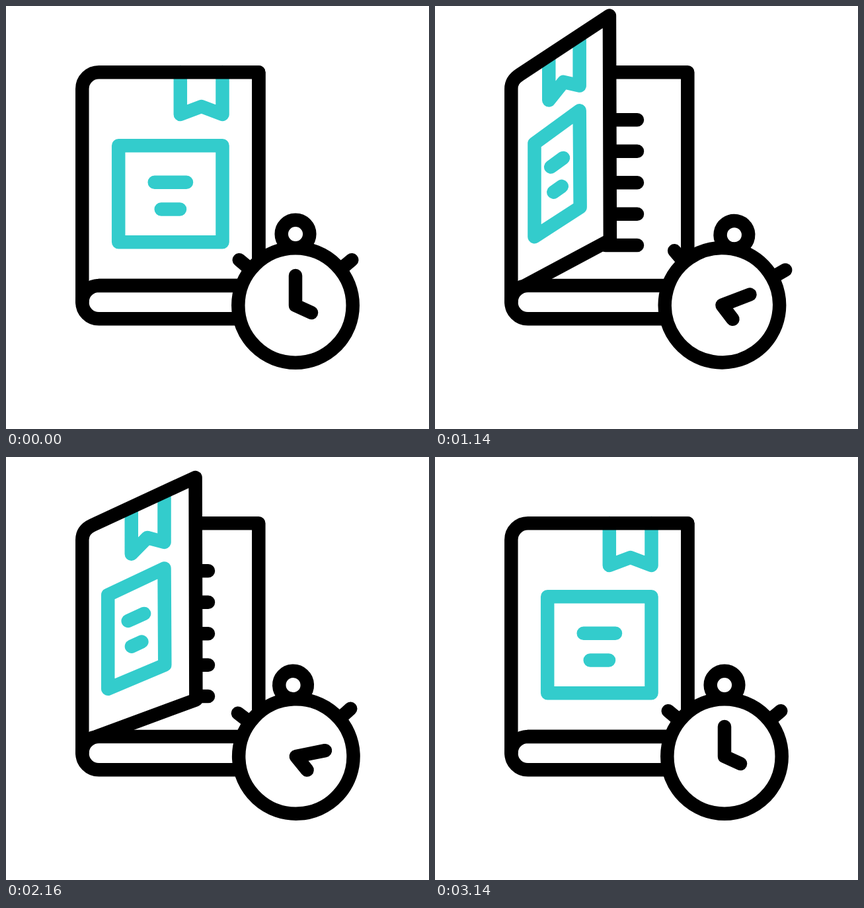
Write an HTML page that moves like this. It is 640x640 px and loops after 3600 ms.

```html
<!DOCTYPE html>
<html lang="en">
<head>
<meta charset="utf-8">
<title>Book and stopwatch</title>
<style>
  html, body { margin: 0; width: 100%; height: 100%; overflow: hidden; background: #fff; }
  svg { display: block; width: 100%; height: 100%; }
  .line { fill: none; stroke: #000; stroke-width: 20.5; stroke-linecap: round; stroke-linejoin: round; }
  .teal { stroke: #33cccc; }
  .white { fill: #fff; }
</style>
</head>
<body>
<svg viewBox="0 0 640 640">
  <path class="line" d="M250 100.3H382.3V423"/>
  <path id="rules" class="line"/>
  <path id="coverFill" class="white"/>
  <path id="label" class="line teal"/>
  <path class="line" d="M382 423H140.5A25 25 0 0 0 140.5 473.3H382"/>
  <path id="coverLine" class="line"/>
  <g id="watch">
    <circle class="line white" cx="438" cy="345" r="21.3"/>
    <path class="line" d="M352.8 384.2L370 398.5M523.2 384.2L506 398.5"/>
    <circle class="line white" cx="438" cy="453" r="86.7"/>
    <path id="hands" class="line"/>
  </g>
</svg>
<script>
const LOOP = 3600, START = 140, END = 3140;
const el = id => document.getElementById(id);
const mix = (a, b, u) => a + (b - a) * u;

// Cubic bezier easing, solved by bisection
const bezier = (x1, y1, x2, y2) => u => {
  const curve = (a, b, s) => 3 * a * s * (1 - s) ** 2 + 3 * b * s * s * (1 - s) + s ** 3;
  let low = 0, high = 1;
  for (let i = 0; i < 24; i++) {
    const mid = (low + high) / 2;
    if (curve(x1, x2, mid) < u) low = mid; else high = mid;
  }
  return curve(y1, y2, low);
};
const snappy = bezier(.32, 0, .315, 1);
const smooth = bezier(.4, 0, .6, 1);
const steady = bezier(.33, .25, .67, .87);
const late = bezier(.4, 0, .7, .85);
const quick = bezier(.1, .5, .5, 1);

const phase = (t, from, to) => Math.min(1, Math.max(0, (t - from) / (to - from)));

// Rises from 0 to 1 until the turn, then falls back along its own easing
const swing = (t, turn, rise, fall) =>
  t < turn ? rise(phase(t, START, turn)) : fall(phase(t, END, turn));

function tiltAt(t) {
  const peak = 10, dip = -3;
  if (t < 1320) return peak * quick(phase(t, START, 1320));
  if (t < 2320) return mix(peak, dip, smooth(phase(t, 1320, 2320)));
  return mix(dip, 0, smooth(phase(t, 2320, 2840)));
}

function drawCover(p) {
  // A point moving from closed to open
  const pt = (x0, y0, x1, y1) => `${mix(x0, x1, p).toFixed(2)} ${mix(y0, y1, p).toFixed(2)}`;
  const corner = `C${pt(115.3, 111.5, 115.3, 115)} ${pt(126.5, 100.3, 120, 109.5)} ${pt(140.5, 100.3, 128, 104)}`;
  const edge = `${corner}L${pt(382.3, 100.3, 261, 12.5)}L${pt(382.3, 423, 262, 352.5)}L${pt(140.5, 423, 137, 422.5)}`;
  el('coverFill').setAttribute('d', `M115.3 423V125.3${edge}Z`);
  el('coverLine').setAttribute('d', `M115.3 448V125.3${edge}`);

  const bookmark = `M${pt(263.8, 100, 170, 78)}L${pt(263.8, 164, 170, 142)}L${pt(295.7, 152, 192, 114)}` +
    `L${pt(327.5, 164, 216, 119.5)}L${pt(327.5, 100, 216, 47)}`;
  const frameBox = `M${pt(170.2, 211.3, 150, 208)}L${pt(327.5, 211.3, 216, 157)}` +
    `L${pt(327.5, 357.3, 217, 303)}L${pt(170.2, 357.3, 150, 349)}Z`;
  const title = `M${pt(224.7, 266.7, 174, 243)}L${pt(273, 266.7, 192, 229)}` +
    `M${pt(234.7, 307.6, 178, 281)}L${pt(263, 307.6, 190, 272)}`;
  el('label').setAttribute('d', bookmark + frameBox + title);
}

function drawWatch(tilt, minute, hour) {
  const hand = (deg, length) => {
    const a = deg * Math.PI / 180;
    return `${(438 + length * Math.sin(a)).toFixed(2)} ${(453 - length * Math.cos(a)).toFixed(2)}`;
  };
  el('hands').setAttribute('d', `M${hand(minute, 45)}L438 453L${hand(hour, 26.5)}`);
  el('watch').setAttribute('transform', `rotate(${tilt.toFixed(3)} 438 432)`);
}

function draw(t) {
  drawCover(swing(t, 1350, snappy, snappy));
  drawWatch(tiltAt(t),
    92 * swing(t, 1860, steady, smooth),
    114.6 + 34 * swing(t, 1800, late, smooth));
}

el('rules').setAttribute('d',
  Array.from({ length: 5 }, (_, i) => `M258 ${172.3 + 47.45 * i}H306`).join(''));

const start = performance.now();
function frame() {
  draw((performance.now() - start) % LOOP);
  requestAnimationFrame(frame);
}
frame();
</script>
</body>
</html>
```
